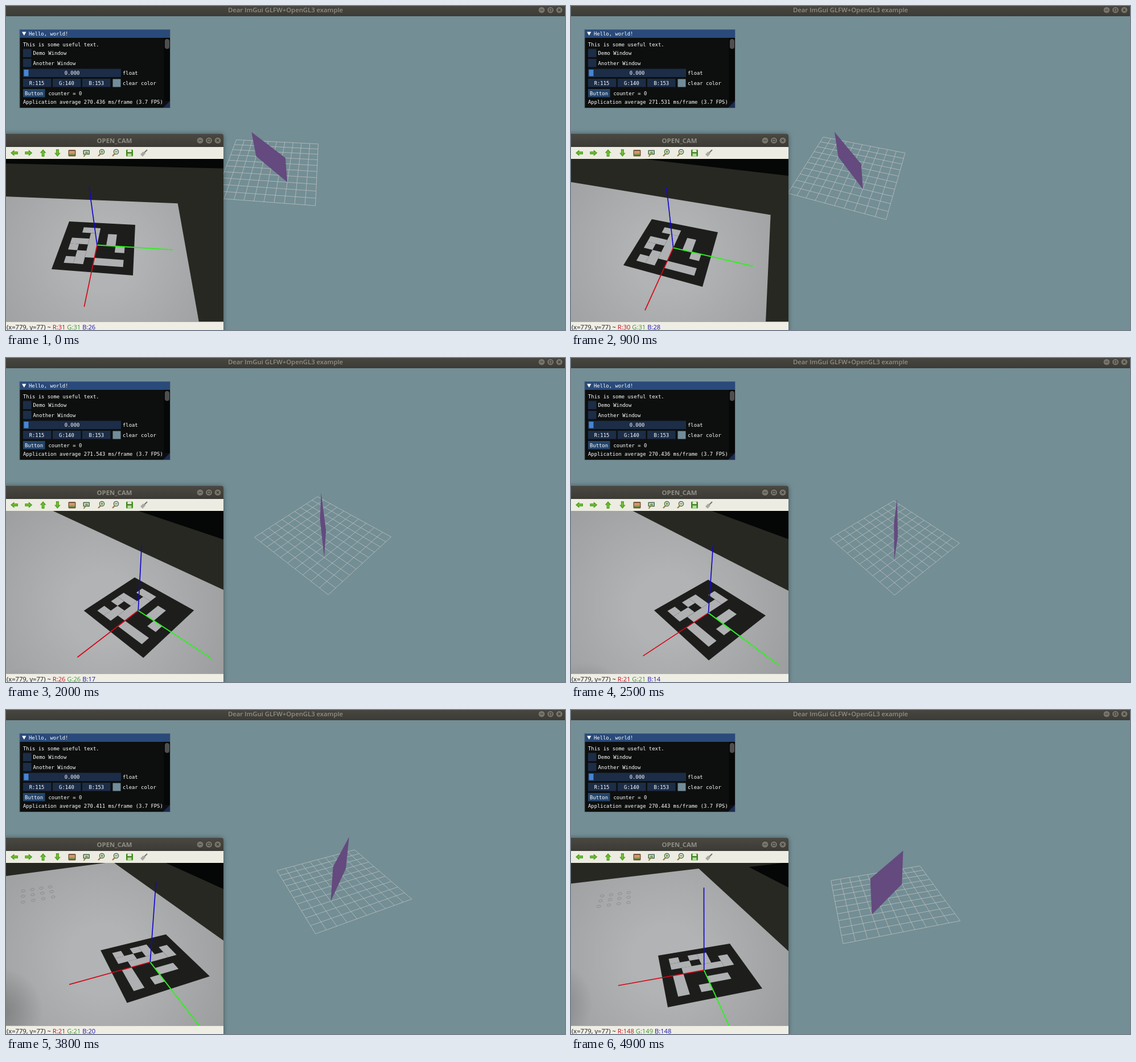
Animation of 982x570 px, one loop 5200 ms. Source, as an HTML page with a canvas:

```html
<!DOCTYPE html>
<html lang="en">
<head>
<meta charset="utf-8">
<title>Marker pose viewer</title>
<style>
html, body { margin: 0; width: 100%; height: 100%; overflow: hidden; background: #738e95; }
canvas { display: block; }
</style>
</head>
<body>
<canvas id="stage" width="982" height="570"></canvas>
<script>
const ctx = document.getElementById('stage').getContext('2d');
const SANS = '"Open Sans", sans-serif', MONO = '8.9px "DejaVu Sans Mono", monospace';
const LOOP = 5200;

// Pinhole camera: focal length and image centre
const F = 380, CX = 191, CY = 412;

// The marker's corners on its path; everything in both views follows from them
const keys = [
  { t: 0,    ms: '270.436', rgb: '31 31 26',    quad: [111,379, 227,385, 223,474, 80,463] },
  { t: 900,  ms: '271.531', rgb: '30 31 28',    quad: [142,375, 258,398, 231,494, 92,456] },
  { t: 1200, ms: '271.543', rgb: '28 28 22',    quad: [153,366, 260,397, 219,485, 94,439] },
  { t: 1400, ms: '271.543', rgb: '26 26 17',    quad: [181,374, 295,417, 239,514, 109,446] },
  { t: 2200, ms: '270.436', rgb: '21 21 14',    quad: [241,390, 342,453, 242,532, 146,444] },
  { t: 2500, ms: '270.436', rgb: '21 21 14',    quad: [242,392, 335,453, 243,528, 152,446] },
  { t: 3300, ms: '270.411', rgb: '21 21 20',    quad: [275,377, 362,444, 239,499, 172,410] },
  { t: 4400, ms: '270.420', rgb: '150 151 151', quad: [288,416, 353,498, 181,535, 159,438] },
  { t: 4900, ms: '270.443', rgb: '148 149 148', quad: [279,411, 336,490, 170,523, 153,432] }
];

// Both views refresh at these tenths of a second, apart from a few misses
const ticks = [0, 1, 3, 5, 6, 9, 12, 14, 17, 20, 22, 25, 28, 30, 33, 35, 36, 38, 40, 41, 44, 45, 47, 49];
const camTicks = ticks.filter(n => ![25, 30].includes(n));
const sceneTicks = ticks.filter(n => ![3, 14, 38].includes(n));
const held = (list, t) => 100 * list.findLast(n => n * 100 <= t);

function stateAt(t) {
  const i = keys.findLastIndex(k => k.t <= t), a = keys[i], b = keys[i + 1] || a;
  const f = (t - a.t) / (b.t - a.t || 1);
  return { ...a, at: solvePose(a.quad.map((n, j) => n + (b.quad[j] - n) * f)) };
}

// Maps marker space (u right, v down, z up; the marker is the unit square) to the image
function solvePose([x0, y0, x1, y1, x2, y2, x3, y3]) {
  const ax = x1 - x2, ay = y1 - y2, bx = x3 - x2, by = y3 - y2;
  const sx = x0 - x1 + x2 - x3, sy = y0 - y1 + y2 - y3, d = ax * by - bx * ay;
  const g = (sx * by - bx * sy) / d, h = (ax * sy - sx * ay) / d;
  const ray = (x, y, w) => [(x - CX * w) / F, (y - CY * w) / F, w];
  const o = ray(x0, y0, 1);
  const a = ray(x1 - x0 + g * x1, y1 - y0 + g * y1, g);
  const b = ray(x3 - x0 + h * x3, y3 - y0 + h * y3, h);
  const up = [b[1] * a[2] - b[2] * a[1], b[2] * a[0] - b[0] * a[2], b[0] * a[1] - b[1] * a[0]];
  const size = Math.hypot(...a);
  return (u, v, z = 0) => {
    const [x, y, w] = o.map((n, i) => n + u * a[i] + v * b[i] + z * up[i] / size);
    return [CX + F * x / w, CY + F * y / w];
  };
}

function rect(x, y, w, h, color, r = 0) {
  ctx.fillStyle = color;
  ctx.beginPath();
  ctx.roundRect(x, y, w, h, r);
  ctx.fill();
}
function poly(p, color) {
  ctx.fillStyle = color;
  ctx.beginPath();
  for (let i = 0; i < p.length; i += 2) ctx.lineTo(p[i], p[i + 1]);
  ctx.fill();
}
function line(a, b, color, width = 1) {
  ctx.strokeStyle = color;
  ctx.lineWidth = width;
  ctx.beginPath();
  ctx.moveTo(...a);
  ctx.lineTo(...b);
  ctx.stroke();
}
function circle(x, y, r, color) {
  ctx.fillStyle = color;
  ctx.beginPath();
  ctx.arc(x, y, r, 0, 7);
  ctx.fill();
}
function text(s, x, y, color, font, align = 'left') {
  ctx.font = font;
  ctx.textAlign = align;
  ctx.fillStyle = color;
  ctx.fillText(s, x, y);
}
function shade(y0, y1, top, bottom) {
  const g = ctx.createLinearGradient(0, y0, 0, y1);
  g.addColorStop(0, top);
  g.addColorStop(1, bottom);
  return g;
}
function glow(x0, y0, r0, x1, y1, r1, inner, outer) {
  const g = ctx.createRadialGradient(x0, y0, r0, x1, y1, r1);
  g.addColorStop(0, inner);
  g.addColorStop(1, outer);
  return g;
}

function windowButtons(x, y) {
  for (let i = 0; i < 3; i++) {
    const cx = x + i * 15.5;
    circle(cx, y, 6.2, '#34332e');
    circle(cx, y, 5.6, '#77746a');
    if (i == 0) line([cx - 2.5, y], [cx + 2.5, y], '#3a3934');
    if (i == 1) {
      ctx.strokeStyle = '#3a3934';
      ctx.strokeRect(cx - 2.2, y - 2, 4.5, 4);
    }
    if (i == 2) for (const s of [-2, 2]) line([cx - 2, y - s], [cx + 2, y + s], '#3a3934', 1.1);
  }
}

function drawScene(at) {
  const see = (u, v, z) => {
    const [x, y] = at(u, v, z);
    return [267 + 1.24 * x, 1.22 * y - 227];
  };
  for (let i = 0; i <= 10; i++) {
    line(see(i / 10, 0), see(i / 10, 1), '#b5bab9', .9);
    line(see(0, i / 10), see(1, i / 10), '#b5bab9', .9);
  }
  const far = .3, near = .7, top = .4;
  poly([see(far, far, top), see(near, near, top), see(near, near), see(far, far)].flat(), '#644a7e');
}

function drawPanel(ms) {
  const label = (s, x, y, align) => text(s, x, y, '#fff', MONO, align);
  const field = '#1c2d47';
  rect(23.5, 41, 265, 138.5, '#58626b');
  rect(24.5, 42, 263.5, 14, '#294a7a');
  rect(24.5, 56, 263.5, 123, '#0d0f0e');
  poly([28,45.5, 35.5,45.5, 31.8,52], '#fff');
  label('Hello, world!', 40, 52);
  label('This is some useful text.', 30, 71);
  ['Demo Window', 'Another Window'].forEach((s, i) => {
    rect(30, 75.5 + i * 17.5, 14.5, 14.5, field);
    label(s, 47.5, 86 + i * 17.5);
  });
  rect(30, 110.5, 172, 14.5, field);
  rect(31.5, 112, 8, 11.5, '#4586d5');
  label('0.000', 116, 121, 'center');
  label('float', 205, 121);
  ['R:115', 'G:140', 'B:153'].forEach((s, i) => {
    rect(30 + i * 52, 128, 49.5, 14.5, field);
    label(s, 54 + i * 52.4, 139, 'center');
  });
  rect(187.5, 128.5, 14, 14, '#738c99');
  label('clear color', 205, 139);
  rect(30, 146, 38.5, 14.5, '#23456c');
  label('Button', 33, 156.5);
  label('counter = 0', 74.5, 156.5);
  label(`Application average ${ms} ms/frame (3.7 FPS)`, 30, 172);
  rect(277.5, 56, 10.5, 111, '#060707');
  rect(279, 58, 8, 17.5, '#4f4f4f', 4);
  poly([288,167, 288,179, 276,179], '#1d2c52');
}

function drawNotes(at) {
  ctx.strokeStyle = 'rgba(70,72,74,.28)';
  ctx.lineWidth = 1;
  for (let i = 0; i < 12; i++) {
    ctx.beginPath();
    ctx.ellipse(...at(-3 + (i >> 2) * .35, 1.4 + (i % 4) * .2), 3.5, 2, -.2, 0, 7);
    ctx.stroke();
  }
}

function drawCamera(at) {
  const patch = (u0, v0, u1, v1, color) =>
    poly([at(u0, v0), at(u1, v0), at(u1, v1), at(u0, v1)].flat(), color);
  ctx.save();
  ctx.beginPath();
  ctx.rect(0, 269, 382, 286.5);
  ctx.clip();
  rect(0, 269, 382, 287, '#272822');
  ctx.filter = 'blur(0.7px)';
  patch(-4, -4, 3, -2, '#050606');
  patch(-4.5, -.64, 1.67, 3.5, glow(170, 440, 60, 170, 430, 290, '#b1b3b4', '#969899'));
  patch(0, 0, 1, 1, '#1d1e1c');
  // white blocks on an 8 by 8 raster: column, row, width, height
  const blocks = [[2,1,2,1], [3,2,1,4], [1,3,2,1], [1,4,1,1], [2,5,1,2], [1,6,1,1],
                  [4,6,3,1], [5,2,1,2], [6,4,1,1]];
  for (const [c, r, w, h] of blocks) patch(c / 8, r / 8, (c + w) / 8, (r + h) / 8, '#aeb0b2');
  ctx.filter = 'none';
  drawNotes(at);
  const [x, y] = at(.6, 2.2);
  circle(x, y, 75, glow(x, y, 0, x, y, 75, 'rgba(60,60,60,.35)', 'rgba(60,60,60,0)'));
  const origin = at(.5, .5);
  line(origin, at(.5, 1.5), '#d40818', 1.7);
  line(origin, at(1.5, .5), '#2cf21c', 1.9);
  line(origin, at(.5, .5, 1), '#1408c8', 1.7);
  ctx.restore();
}

function arrow(x, turn) {
  ctx.save();
  ctx.translate(x, 258.5);
  ctx.rotate(turn * Math.PI / 2);
  poly([-6.5,0, 0,-5.5, 0,-2.5, 6.5,-2.5, 6.5,2.5, 0,2.5, 0,5.5], '#55a522');
  line([-3, 0], [5, 0], '#86c94f', 1.5);
  ctx.restore();
}

function lens(x, mark) {
  line([x - 5, 264], [x - 1, 260], '#a27b35', 2.4);
  circle(x + 1.5, 256.5, 4.8, '#4d5c4b');
  circle(x + 1.5, 256.5, 3.6, '#d5e2cf');
  line([x - .7, 256.5], [x + 3.7, 256.5], '#4d9e29', 1.4);
  if (mark == '+') line([x + 1.5, 254.3], [x + 1.5, 258.7], '#4d9e29', 1.4);
}

function drawToolbar() {
  rect(0, 248, 382, 21.5, '#edece2');
  [0, 2, 1, 3].forEach((turn, i) => arrow(14.5 + i * 25.3, turn));
  rect(109.5, 253, 13, 11.5, '#77523d', 1.5);
  rect(111, 255, 10, 7, '#d39a63');
  rect(111, 259.5, 10, 2.5, '#7d9a4c');
  rect(135.5, 253.5, 11.5, 8, '#4f6457', 1);
  rect(137, 255, 8.5, 5, '#c7dbc7');
  line([136.5, 265], [140, 260.5], '#a27b35', 2);
  circle(141.5, 258.5, 2.5, '#72a55a');
  lens(167, '+');
  lens(192, '-');
  rect(211, 252.5, 12, 12, '#3f8c1e', 1.5);
  rect(213.5, 252.5, 7, 4.5, '#e2ecd9');
  rect(213.5, 259.5, 7, 5, '#b9dba4');
  line([243, 258], [248, 253], '#777870', 2.2);
  poly([236,261, 241,256, 245,259.5, 240,265], '#a9a99f');
}

function drawStatus(rgb) {
  rect(0, 555.5, 382, 14.5, '#efeee5');
  const [r, g, b] = rgb.split(' ');
  const parts = [['(x=779, y=77) ~ ', '#1c1c1c'], [`R:${r} `, '#c80f18'],
                 [`G:${g} `, '#3b9a2d'], [`B:${b}`, '#1d14b4']];
  let x = 1;
  for (const [s, color] of parts) {
    text(s, x, 568.5, color, '500 11.2px ' + SANS);
    x += ctx.measureText(s).width;
  }
}

function draw(now) {
  const t = now % LOOP;
  const cam = stateAt(held(camTicks, t)), scene = stateAt(held(sceneTicks, t));
  rect(0, 0, 982, 570, '#738e95');
  drawScene(scene.at);
  drawPanel(scene.ms);

  rect(0, 0, 982, 18, shade(0, 18, '#474640', '#3c3b36'));
  text('Dear ImGui GLFW+OpenGL3 example', 491, 11, '#918e83', '600 11.3px ' + SANS, 'center');
  windowButtons(941, 7);

  ctx.save();
  ctx.shadowColor = 'rgba(0,0,0,.4)';
  ctx.shadowBlur = 9;
  rect(-8, 225, 390, 353, '#3c3b36', [0, 5, 0, 0]);
  ctx.restore();
  rect(0, 225, 382, 23, shade(225, 248, '#494842', '#3b3a35'), [4, 4, 0, 0]);
  text('OPEN_CAM', 190.5, 240.5, '#918e83', 'bold 11.3px ' + SANS, 'center');
  windowButtons(341, 236.5);
  drawToolbar();
  drawCamera(cam.at);
  drawStatus(cam.rgb);
}

function tick() {
  draw(performance.now());
  requestAnimationFrame(tick);
}
tick();
</script>
</body>
</html>
```
